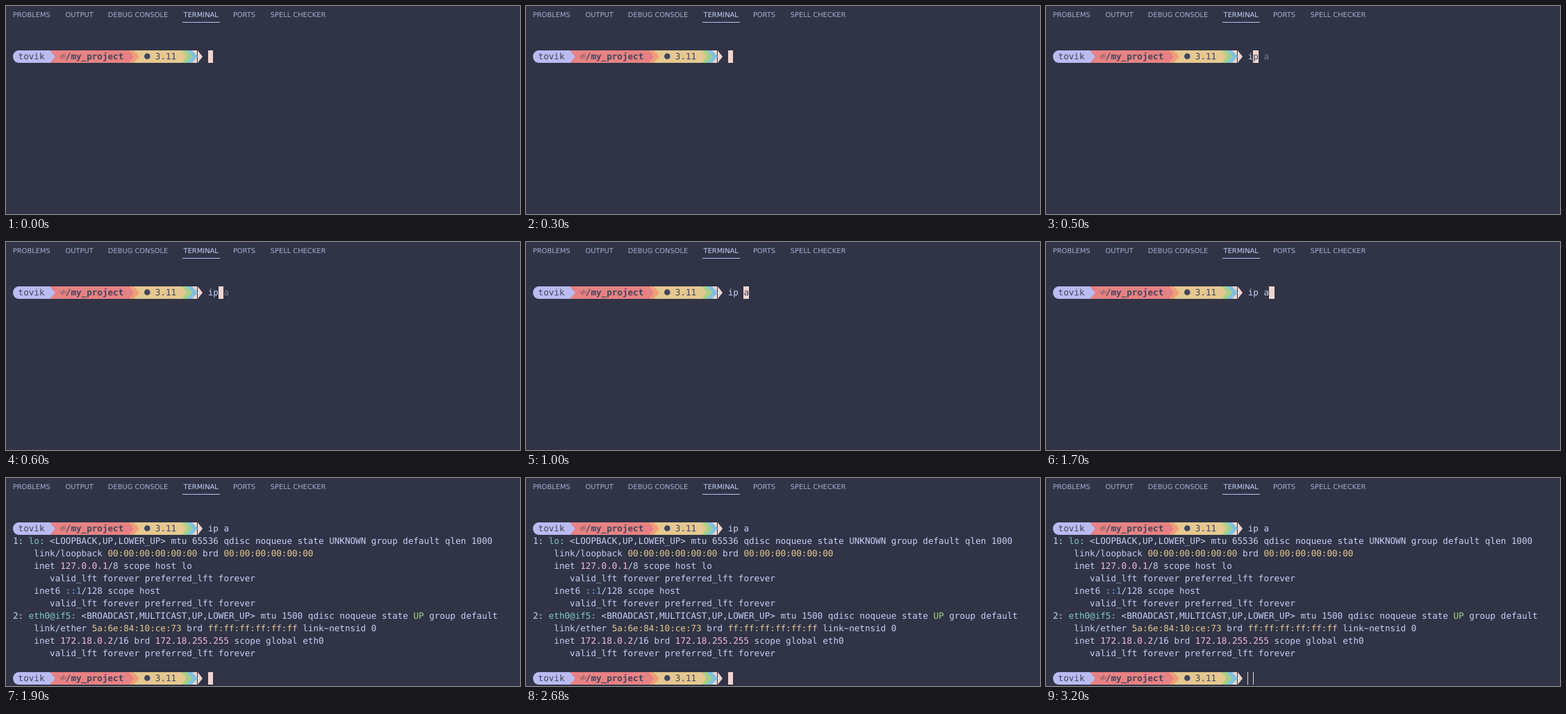
An HTML page for the animation above (3.4 s loop, 740 by 300 pixels).

```html
<!DOCTYPE html>
<html lang="en">
<head>
<meta charset="utf-8">
<title>Terminal</title>
<style>
  html, body { margin: 0; width: 100%; height: 100%; overflow: hidden; background: #303446; }
  svg { display: block; width: 740px; height: 300px; }
  text { white-space: pre; text-rendering: geometricPrecision; }
  .tab { font: 9.9px "DejaVu Sans", sans-serif; }
  .mono { font: 12.6px "DejaVu Sans Mono", monospace; }
  .bold { font-weight: 700; }
</style>
</head>
<body>
<svg id="stage" viewBox="0 0 740 300" xmlns="http://www.w3.org/2000/svg"></svg>
<script>
const LOOP = 3400;
const CELL = 12.6 * 0.60205, ROW = 18, LEFT = 10, TOP = 64;
const C = {
  text: '#c6d0f5', dim: '#a5adce', ghost: '#737994', ink: '#414559', bg: '#303446',
  lavender: '#babbf1', red: '#e78284', peach: '#ef9f76', yellow: '#e5c890', green: '#a6d189',
  sapphire: '#85c1dc', rose: '#f2d5cf', teal: '#81c8be', pink: '#f4b8e4', blue: '#8caaee'
};
const stage = document.getElementById('stage');

function add(parent, tag, attrs, text) {
  const el = document.createElementNS('http://www.w3.org/2000/svg', tag);
  for (const key in attrs) el.setAttribute(key, attrs[key]);
  if (text !== undefined) el.textContent = text;
  parent.appendChild(el);
  return el;
}

const colX = col => LEFT + col * CELL;
const edge = col => Math.round(colX(col));
const rowY = row => TOP + row * ROW;

// Places every word on the character grid and returns the next column.
function put(parent, col, row, str, fill, cls = '') {
  for (const word of str.matchAll(/\S+/g)) {
    add(parent, 'text', {
      x: colX(col + word.index).toFixed(2), y: rowY(row) + 13, fill, class: 'mono ' + cls
    }, word[0]);
  }
  return col + str.length;
}

function band(parent, from, to, row, fill) {
  add(parent, 'rect', { x: edge(from), y: rowY(row), width: edge(to) - edge(from), height: ROW, fill });
}

function arrow(parent, col, row, fill) {
  const x = edge(col), y = rowY(row);
  add(parent, 'path', { d: `M${x} ${y}L${edge(col + 1)} ${y + 9}L${x} ${y + 18}Z`, fill });
}

function prompt(parent, row) {
  const y = rowY(row);
  add(parent, 'path', { d: `M18 ${y}A8 9 0 0 0 18 ${y + 18}Z`, fill: C.lavender });
  band(parent, 1, 7, row, C.lavender);
  band(parent, 7, 22, row, C.red);
  band(parent, 22, 23, row, C.peach);
  band(parent, 23, 32, row, C.yellow);
  band(parent, 32, 33, row, C.green);
  band(parent, 33, 34, row, C.sapphire);
  add(parent, 'rect', { x: edge(34), y, width: 7, height: ROW, fill: C.rose });
  arrow(parent, 7, row, C.lavender);
  arrow(parent, 22, row, C.red);
  arrow(parent, 23, row, C.peach);
  arrow(parent, 32, row, C.yellow);
  arrow(parent, 33, row, C.green);
  arrow(parent, 34, row, C.sapphire);
  arrow(parent, 35, row, C.rose);
  put(parent, 1, row, 'tovik', C.ink);
  add(parent, 'path', {
    d: `M80.3 ${y + 6.3}l-2.1 2.2l2.1 2.2M83.1 ${y + 5}l-1.9 7M84 ${y + 6.3}l2.1 2.2l-2.1 2.2`,
    fill: 'none', stroke: C.ink, 'stroke-width': 0.8
  });
  put(parent, 10, row, '/my_project', C.ink, 'bold');
  add(parent, 'circle', { cx: 203.3, cy: y + 8.5, r: 4.3, fill: C.ink });
  put(parent, 27, row, '3.11', C.ink);
}

const output = [
  ['1: ', ['teal', 'lo:'], ' <LOOPBACK,UP,LOWER_UP> mtu 65536 qdisc noqueue state UNKNOWN group default qlen 1000'],
  ['    link/loopback ', ['yellow', '00:00:00:00:00:00'], ' brd ', ['yellow', '00:00:00:00:00:00']],
  ['    inet ', ['pink', '127.0.0.1'], '/8 scope host lo'],
  ['       valid_lft forever preferred_lft forever'],
  ['    inet6 ', ['blue', '::1'], '/128 scope host'],
  ['       valid_lft forever preferred_lft forever'],
  ['2: ', ['teal', 'eth0@if5:'], ' <BROADCAST,MULTICAST,UP,LOWER_UP> mtu 1500 qdisc noqueue state ', ['green', 'UP'], ' group default'],
  ['    link/ether ', ['yellow', '5a:6e:84:10:ce:73'], ' brd ', ['yellow', 'ff:ff:ff:ff:ff:ff'], ' link\u2212netnsid 0'],
  ['    inet ', ['pink', '172.18.0.2'], '/16 brd ', ['pink', '172.18.255.255'], ' scope global eth0'],
  ['       valid_lft forever preferred_lft forever']
];

add(stage, 'rect', { width: 740, height: 300, fill: C.bg });

const tabs = [
  ['PROBLEMS', 9.8], ['OUTPUT', 85.5], ['DEBUG CONSOLE', 146.8],
  ['TERMINAL', 255.6], ['PORTS', 326.9], ['SPELL CHECKER', 380.7]
];
for (const [name, x] of tabs) {
  add(stage, 'text', { x, y: 16, class: 'tab', fill: name === 'TERMINAL' ? C.text : C.dim }, name);
}
add(stage, 'rect', { x: 254, y: 23, width: 54, height: 1, fill: C.lavender });

prompt(stage, 0);

const result = add(stage, 'g', {});
output.forEach((line, i) => {
  let col = 0;
  for (const part of line) {
    const [color, str] = Array.isArray(part) ? part : ['text', part];
    col = put(result, col, i + 1, str, C[color]);
  }
});
prompt(result, 12);

const live = add(stage, 'g', {});
const COMMAND = 'ip a', INPUT = 37;

function stateAt(t) {
  if (t < 500) return { typed: 0 };
  if (t < 600) return { typed: 1, hint: true };
  if (t < 1000) return { typed: 2, hint: true };
  if (t < 1400) return { typed: 3, hint: true };
  if (t < 1900) return { typed: 4 };
  return { typed: 4, done: true, hollow: t >= 3200 };
}

let last = '';
function draw(t) {
  const s = stateAt(t), key = JSON.stringify(s);
  if (key === last) return;
  last = key;
  result.setAttribute('display', s.done ? 'inline' : 'none');
  live.replaceChildren();

  const row = s.done ? 12 : 0, col = s.done ? INPUT : INPUT + s.typed;
  if (s.hollow) {
    for (const x of [290, 298]) {
      add(live, 'rect', { x, y: rowY(row), width: 1, height: ROW, fill: C.rose });
    }
  } else {
    band(live, col, col + 1, row, C.rose);
  }
  put(live, INPUT, 0, COMMAND.slice(0, s.typed), C.text);
  if (s.hint) {
    put(live, col, 0, COMMAND[s.typed], C.ink);
    put(live, col + 1, 0, COMMAND.slice(s.typed + 1), C.ghost);
  }
}

const start = performance.now();
function tick() {
  draw((performance.now() - start) % LOOP);
  requestAnimationFrame(tick);
}
tick();
</script>
</body>
</html>
```
